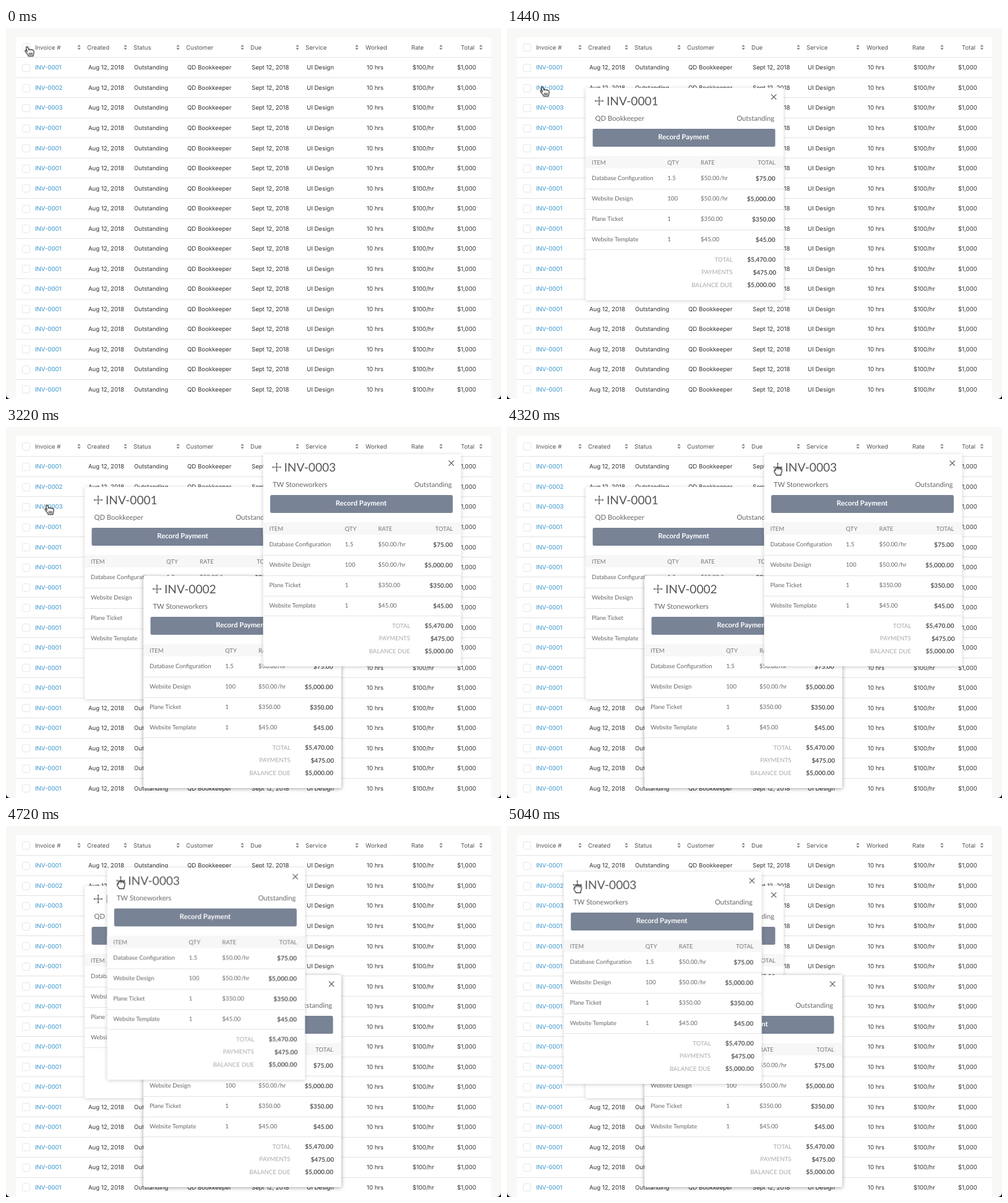
Recreate the animation shown at these times as an HTML page. Size 800x600 px, loop 5780 ms.

```html
<!DOCTYPE html>
<html lang="en">
<head>
<meta charset="utf-8">
<title>Invoices</title>
<style>
  html, body { margin: 0; width: 100%; height: 100%; overflow: hidden; background: #000; }
  svg { display: block; width: 800px; height: 600px; background: #f8f8f6; border-radius: 0 0 7px 7px; }
  text { text-rendering: geometricPrecision; white-space: pre; }
  .table { font: 400 9.6px Inter, sans-serif; fill: #333; }
  .table .head { fill: #555; }
  .table .link { fill: #3594cd; }
  .card { font: 9.6px Lato, sans-serif; fill: #666; }
  .card .title { font-size: 19.1px; fill: #555; }
  .card .sub { font-size: 11.2px; }
  .card .button { font-size: 11.3px; font-weight: 700; fill: #fff; }
  .card .head { font-size: 9.5px; fill: #777; }
  .card .label { font-size: 9.7px; fill: #aaa; }
  .card .sum { font-size: 10.1px; font-weight: 700; fill: #555; }
  .line { stroke: #e4e4e4; stroke-width: 1; }
  .icon { stroke: #555; stroke-width: 1.2; fill: none; }
  .hand { fill: #fff; stroke: #111; stroke-width: 1; stroke-linejoin: round; stroke-linecap: round; }
</style>
</head>
<body>
<svg id="stage" viewBox="0 0 800 600"></svg>
<script>
const LOOP = 5780;
const NS = "http://www.w3.org/2000/svg";
const stage = document.getElementById("stage");

function add(parent, tag, attrs = {}, content) {
  const el = document.createElementNS(NS, tag);
  for (const key in attrs) el.setAttribute(key, attrs[key]);
  if (content !== undefined) el.textContent = content;
  parent.append(el);
  return el;
}

const text = (g, x, y, str, cls = "", anchor = "start") =>
  add(g, "text", { x, y, class: cls, "text-anchor": anchor }, str);
const line = (g, x1, x2, y) => add(g, "line", { x1, x2, y1: y, y2: y, class: "line" });
const path = (g, d, cls = "") => add(g, "path", { d, class: cls });

// Invoice table
function drawTable() {
  const g = add(stage, "g", { class: "table" });
  add(g, "rect", { x: 16, y: 15, width: 768, height: 590, fill: "#fff" });
  const checkbox = y => add(g, "rect", {
    x: 26.5, y: y - 6, width: 12, height: 12, rx: 2, fill: "#fff", stroke: "#e6e6e6"
  });

  const heads = [[47, "Invoice #", 118], [131, "Created", 193], [206, "Status", 278],
    [291, "Customer", 382], [395, "Due", 471], [484, "Service", 567],
    [581, "Worked"], [655, "Rate", 703], [735, "Total", 767.5]];
  checkbox(31.5);
  for (const [x, label, sort] of heads) {
    text(g, x, 34.8, label, "head");
    if (sort) add(g, "path", {
      d: `M${sort - 2.7} 30.3h5.4l-2.7-3.3zM${sort - 2.7} 32.3h5.4l-2.7 3.3z`, fill: "#888"
    });
  }
  line(g, 16, 784, 47.5);

  const cells = [[133, "Aug 12, 2018"], [207, "Outstanding"], [293, "QD Bookkeeper"],
    [397, "Sept 12, 2018"], [486, "UI Design"], [583, "10 hrs"], [657, "$100/hr"], [729, "$1,000"]];
  for (let i = 0; i < 17; i++) {
    const y = 64 + i * 32.53;
    checkbox(Math.round(y) + 0.5);
    text(g, 47, y + 3.4, "INV-000" + (i < 3 ? i + 1 : 1), "link");
    for (const [x, str] of cells) text(g, x, y + 3.4, str);
    line(g, 16, 784, Math.floor(y + 16.3) + 0.5);
  }
}

// Invoice card, drawn around its own top left corner
function drawCard(id, customer, shadow) {
  const g = add(stage, "g", { class: "card" });
  add(g, "rect", {
    width: 320, height: 343, rx: 2, fill: "#fff",
    style: `filter: drop-shadow(0 1px 3px rgba(0,0,0,${shadow}))`
  });
  path(g, "M15.5 21h13M22 14.5v13M21 15.5l1-1 1 1M21 26.5l1 1 1-1" +
    "M16.5 20l-1 1 1 1M27.5 20l1 1-1 1", "icon");
  text(g, 34, 27.5, id, "title");
  path(g, "M300 10.3l8.4 8.4M308.4 10.3l-8.4 8.4", "icon");
  text(g, 15.5, 53.2, customer, "sub");
  text(g, 305, 53.2, "Outstanding", "sub", "end");
  add(g, "rect", { x: 11.5, y: 66, width: 295, height: 29, rx: 2.5, fill: "#798396" });
  text(g, 158.5, 82.5, "Record Payment", "button", "middle");

  add(g, "rect", { y: 110, width: 320, height: 20, fill: "#f7f7f7" });
  text(g, 10, 124, "ITEM", "head");
  text(g, 132, 124, "QTY", "head");
  text(g, 186, 124, "RATE", "head");
  text(g, 307, 124, "TOTAL", "head", "end");

  const items = [["Database Configuration", "1.5", "$50.00\u200a/hr", "$75.00"],
    ["Website Design", "100", "$50.00\u200a/hr", "$5,000.00"],
    ["Plane Ticket", "1", "$350.00", "$350.00"],
    ["Website Template", "1", "$45.00", "$45.00"]];
  items.forEach(([name, qty, rate, total], i) => {
    const y = 148.5 + i * 33.3;
    text(g, 10, y, name);
    text(g, 132.3, y, qty);
    text(g, 186, y, rate);
    text(g, 306.5, y + 1, total, "sum", "end");
    line(g, 0, 320, Math.round(163 + i * 32.8) + 0.5);
  });

  const sums = [["TOTAL", "$5,470.00", 238, 307], ["PAYMENTS", "$475.00", 237.5, 308],
    ["BALANCE DUE", "$5,000.00", 237.5, 307]];
  sums.forEach(([label, value, x, right], i) => {
    const y = 280.5 + i * 20.6;
    text(g, x, y, label, "label", "end");
    text(g, right, y + 0.5, value, "sum", "end");
  });
  return g;
}

function drawCursor() {
  const g = add(stage, "g");
  const point = add(g, "g", { class: "hand", transform: "translate(-.6 .6) scale(1.12)" });
  path(point, "M-2.9 .2L-4.3-5.6q-.1-1.9 1.3-2q1.2 0 1.6 1.5l.9 3.4q.3-1.1 1.4-1q1 .1 1.2 1" +
    "q.4-.9 1.4-.7q.9.2 1.1 1.1q.5-.5 1.3-.1q1 .5 1 1.9q.1 2.5-.8 4.4l-.4 2.2h-6.7" +
    "q-.5-1.7-2-3.4l-2.4-3q-.8-1.4.3-2q1-.4 2.1.9z");
  path(point, "M.2 1.6v2.4M2.1 1.6v2.4M4 1.6v2.4");
  const grab = add(g, "g", { class: "hand", transform: "scale(1.12)" });
  path(grab, "M-4-3q.6-1.9 2.4-1.2q1-1.4 2.6-.2q1.3-1 2.4.5q1.8-.5 2.1 1.3v3q-.1 2-1.2 3.6v2.2" +
    "h-6.8q-.3-1.5-1.8-3q-1.8-2-1.2-3.4q.3-.9 1.5-.9z");
  path(grab, "M-4-3v2.8M-1.5-4v1.8M1-4.2v2M3.4-3.7v1.8");
  return { g, point, grab };
}

// Each step: [time in ms, value, easing towards the next step]
function run(el, prop, steps) {
  const all = [[0, steps[0][1]], ...steps, [LOOP, steps[steps.length - 1][1]]];
  const frames = all.map(([t, value, easing = "linear"]) =>
    ({ offset: t / LOOP, [prop]: value, easing }));
  el.animate(frames, { duration: LOOP, iterations: Infinity }).startTime = start;
}

const at = (x, y) => `translate(${x}px, ${y}px)`;
const fadeIn = (el, t) => run(el, "opacity", [[t, 0, "ease"], [t + 300, 1]]);
const swap = (el, t, from, to) => run(el, "opacity", [[t, from], [t, to]]);

drawTable();
const cards = [
  drawCard("INV-0001", "QD Bookkeeper", 0.18),
  drawCard("INV-0002", "TW Stoneworkers", 0.38),
  drawCard("INV-0003", "TW Stoneworkers", 0.2)
];
const cursor = drawCursor();
const start = document.timeline.currentTime || 0;

const settle = "cubic-bezier(.16, 1, .3, 1)";
const drag = [4411, 5061];

cards[0].style.transform = at(127, 97);
cards[1].style.transform = at(222, 241);
run(cards[2], "transform", [[drag[0], at(415.5, 44), "ease"], [drag[1], at(91.5, 74)]]);
[600, 1490, 2560].forEach((t, i) => fadeIn(cards[i], t));

run(cursor.g, "transform", [
  [5, at(38, 38), "ease"], [500, at(57, 71)],
  [1165, at(57, 71), "ease"], [1450, at(61, 103)],
  [2325, at(61, 103), settle], [2575, at(70, 134)],
  [3270, at(70, 134), "ease"], [3720, at(438, 71)],
  [drag[0], at(438, 71), "ease"], [drag[1], at(114, 101)]
]);
swap(cursor.point, 4160, 1, 0);
swap(cursor.grab, 4160, 0, 1);
</script>
</body>
</html>
```
